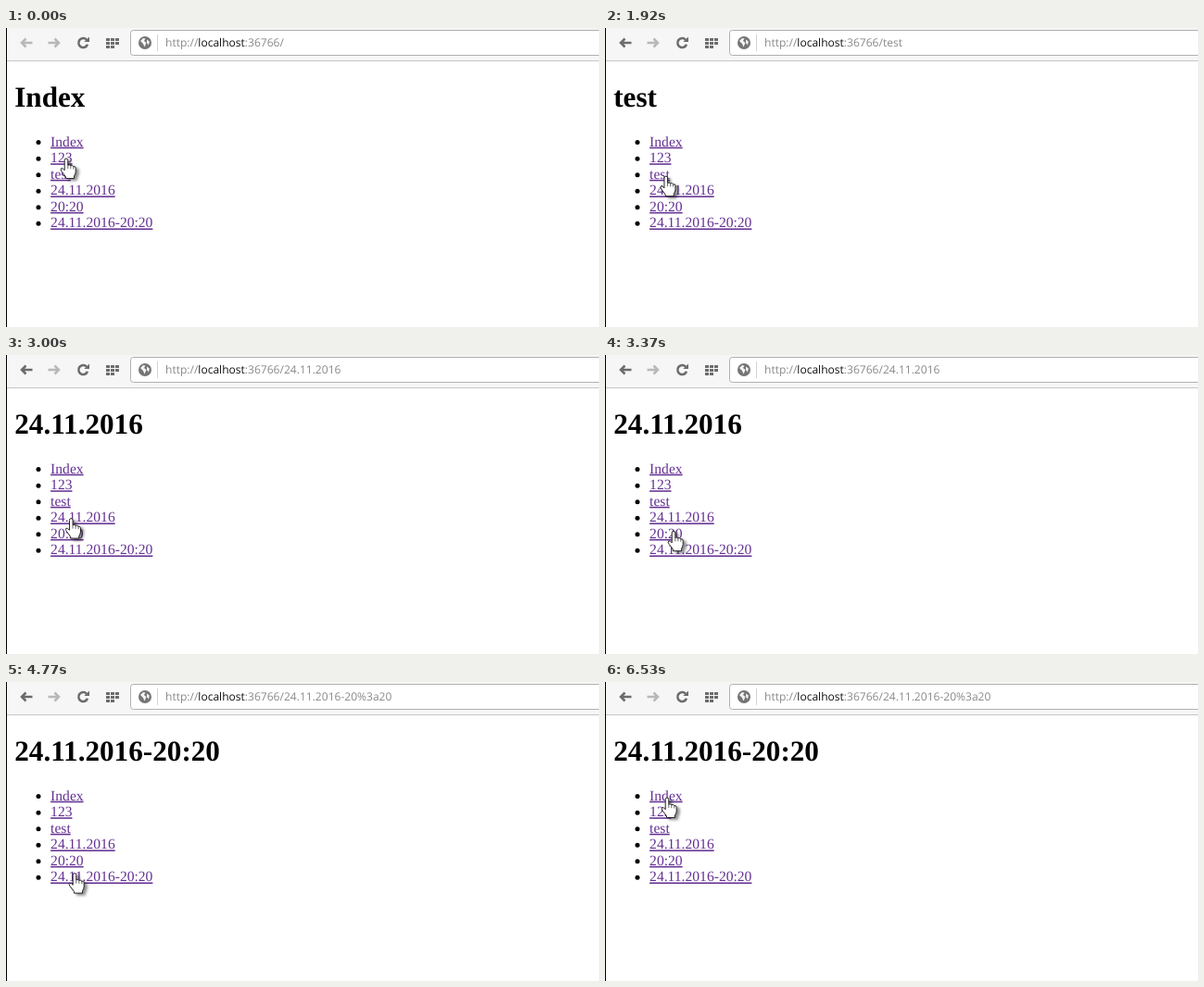
Recreate the animation shown at these times as an HTML page. Size 640 by 323 pixels, loop 6730 ms.

```html
<!DOCTYPE html>
<html lang="en">
<head>
<meta charset="utf-8">
<title>Page navigation</title>
<style>
  html, body { margin: 0; width: 100%; height: 100%; overflow: hidden; background: #fff; }
  svg { display: block; width: 640px; height: 323px; }
  text { text-rendering: geometricPrecision; white-space: pre; }
  #heading { font: bold 31.2px "Liberation Serif", serif; }
  #links text { font: 15.6px "Liberation Serif", serif; fill: #643193; text-decoration: underline; }
  #links text.active { fill: #f22; }
  #url { font: 12.05px "Open Sans", sans-serif; fill: #8a8a8a; }
  #url .host { fill: #111; }
  .icon { fill: none; stroke: #6c6c6c; stroke-width: 2.5; }
  .off { stroke: #b8b8b8; }
  #hand { filter: drop-shadow(3px 2px 1.5px rgba(0, 0, 0, .45)); }
</style>
</head>
<body>
<svg viewBox="0 0 640 323">
  <rect width="640" height="323" fill="#fff"/>
  <rect width="640" height="35" fill="#f6f6f6"/>
  <rect y="35" width="640" height="1" fill="#c6c6c6"/>
  <rect x="134.5" y="2.5" width="520" height="27" rx="3" fill="#fff" stroke="#b0b0b0"/>
  <path id="back" class="icon" d="M28.5 16H17M21.5 11.5L17 16L21.5 20.5"/>
  <path class="icon off" d="M45.5 16H57M52.5 11.5L57 16L52.5 20.5"/>
  <g id="reload">
    <path class="icon" d="M87 12.6A5 5 0 1 0 88 17.8"/>
    <path d="M90 9.5V15H84.3Z" fill="#6c6c6c"/>
  </g>
  <path id="stop" class="icon" d="M78.5 11L88.5 21M88.5 11L78.5 21"/>
  <g id="dial" fill="#6c6c6c"></g>
  <circle cx="150" cy="16" r="7" fill="#757575"/>
  <path d="M145 14L148 11L150.5 11.5L149 14L151.5 16L149.5 20.5L148 17ZM152 12.5L154.8 14.5L154 18.5L152 16Z" fill="#f4f4f4"/>
  <rect x="163" y="7" width="1" height="18" fill="#d2d2d2"/>
  <text id="url" x="172" y="20.3">http://<tspan class="host">localhost</tspan>:36766/<tspan id="path"></tspan></text>
  <text id="heading" x="9.2" y="85"></text>
  <g id="links"></g>
  <rect width="1" height="323" fill="#000"/>
  <g id="hand">
    <path d="M-1.8 1.8Q-1.8 0 0 0Q1.8 0 1.8 1.8V7.3Q3.4 6.2 4.8 7.7Q6.6 6.9 7.8 8.6Q9.8 8.1 10.2 10.2V14.5Q10 17 8.5 19V21.5H-.5V20Q-2 17.5 -4.8 14.2Q-6.8 11.5 -5.3 10.6Q-3.8 10 -1.8 12.7Z" fill="#fff" stroke="#222" stroke-linejoin="round"/>
    <path d="M1.8 7.3V11M4.8 7.7V11.2M7.8 8.6V11.5" fill="none" stroke="#444" stroke-width=".8"/>
  </g>
</svg>
<script>
const LOOP = 6730, STEP = 60, MOVE_STEPS = 7, PRESS_TIME = 130;
const pages = ["Index", "123", "test", "24.11.2016", "20:20", "24.11.2016-20:20"];

// Each visit opens the next page; afterwards the hand leaves for the next link.
const visits = [
  { press: 460, load: 650, leave: 980 },
  { press: 1600, load: 1920, leave: 1920 },
  { press: 2550, load: 2800, leave: 3000 },
  { press: 3570, load: 3760, leave: 3960 },
  { press: 4520, load: 4770, leave: 6100 }
];

const $ = id => document.getElementById(id);
const clamp = v => Math.min(1, Math.max(0, v));
const mix = (a, b, k) => a + (b - a) * k;

$("links").innerHTML = pages.map((name, i) => {
  const y = 127.7 + 17.55 * i;
  return `<circle cx="35" cy="${y - 4.1}" r="2.5"/><text x="48.1" y="${y}">${name}</text>`;
}).join("");
const links = document.querySelectorAll("#links text");

$("dial").innerHTML = Array.from({ length: 8 }, (_, i) =>
  `<rect x="${108 + 5 * (i % 3)}" y="${11 + 4 * Math.floor(i / 3)}" width="4" height="3"/>`).join("");

// Resting place of the hand for each visit, drifting right on the way down.
const restAt = i => i < visits.length
  ? [65 + 9 * clamp((i - 1) / 2), 141 + 16.4 * i]
  : [67, 125];

function handAt(t) {
  const last = visits.findLastIndex(v => v.leave <= t);
  if (last < 0) return restAt(0);
  const step = Math.floor((t - visits[last].leave) / STEP) + 1;
  const k = 1 - (1 - clamp(step / MOVE_STEPS)) ** 1.2;
  const to = restAt(last + 1);
  return restAt(last).map((from, axis) => mix(from, to[axis], k));
}

function render(t) {
  const page = visits.filter(v => v.load <= t).length;
  const next = visits[page];
  const sincePress = next ? t - next.press : -1;
  const pressed = sincePress >= 0 && sincePress < PRESS_TIME ? page + 1 : -1;
  const loading = sincePress >= PRESS_TIME;

  $("heading").textContent = pages[page];
  $("path").textContent = page ? pages[page].replace(":", "%3a") : "";
  $("back").classList.toggle("off", page === 0);
  $("reload").style.display = loading ? "none" : "";
  $("stop").style.display = loading ? "" : "none";
  links.forEach((link, i) => link.classList.toggle("active", i === pressed));
  $("hand").setAttribute("transform", `translate(${handAt(t)})`);
}

const begin = performance.now();
function tick() {
  render((performance.now() - begin) % LOOP);
  requestAnimationFrame(tick);
}
tick();
</script>
</body>
</html>
```
